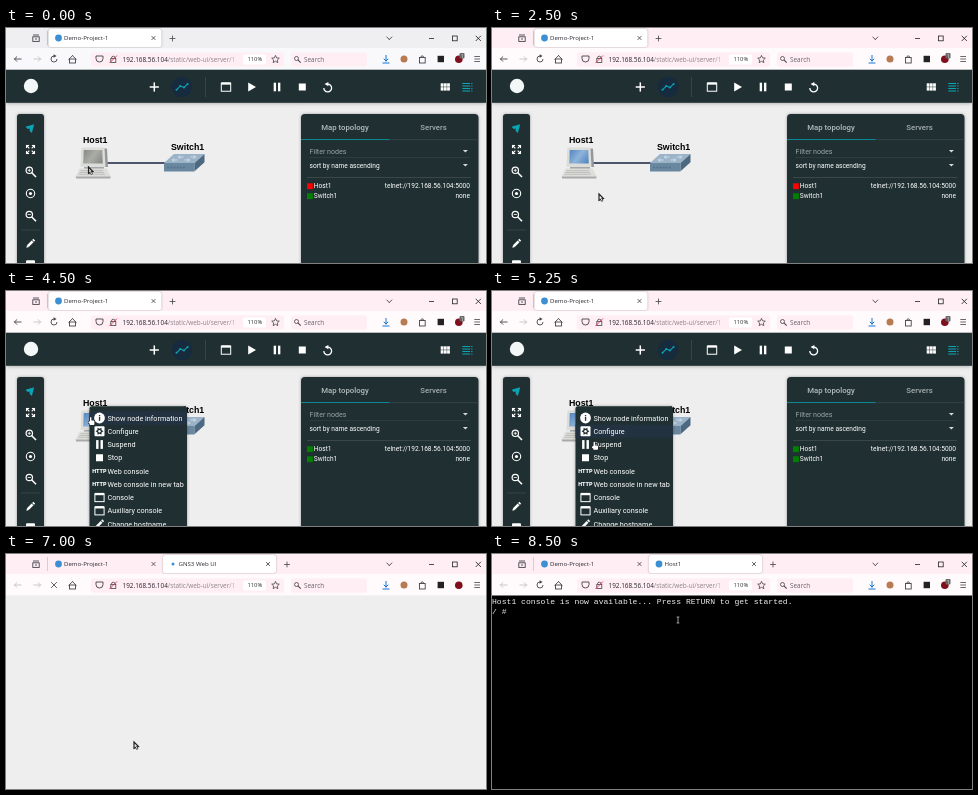
An HTML page with a canvas for the animation above (8750 ms loop, 480 px wide and 235 px high).

```html
<!DOCTYPE html>
<html lang="en">
<head>
<meta charset="utf-8">
<title>Web console demo</title>
<style>
html, body { margin: 0; width: 100%; height: 100%; overflow: hidden; background: #eee; }
canvas { display: block; width: 480px; height: 235px; }
</style>
</head>
<body>
<canvas id="stage"></canvas>
<script>
const W = 480, H = 235, LOOP = 8750, STEP = 250, ROW = 13.25, PI = Math.PI;
const canvas = document.getElementById('stage');
const dpr = window.devicePixelRatio || 1;
canvas.width = W * dpr;
canvas.height = H * dpr;
const c = canvas.getContext('2d');

const DARK = '#203032', TEAL = '#0aa5b5', WHITE = '#fff', INK = '#45434a', PALE = '#c6c1c4';
const UI = '"Open Sans", "Noto Sans", sans-serif';
const APP = 'Roboto, sans-serif';
const LABEL = '"Liberation Sans", Arial, sans-serif';
const MONO = '"Liberation Mono", monospace';

const HOME = { x: 82.5, y: 139 };
const MOVES = [
  { from: 1250, to: 2000, x: 107, y: 166 },
  { from: 3500, to: 4250, x: 84, y: 126 },
  { from: 4750, to: 6000, x: 128, y: 188 },
  { from: 7250, to: 8000, x: 186, y: 66 }
];

function pointerAt(t) {
  return MOVES.reduce((p, m) => {
    const u = Math.min(1, Math.max(0, (t - m.from) / (m.to - m.from)));
    return { x: p.x + (m.x - p.x) * u, y: p.y + (m.y - p.y) * u };
  }, HOME);
}

// Drawing helpers

function at(x, y, angle, draw) {
  c.save();
  c.translate(x, y);
  c.rotate(angle);
  draw();
  c.restore();
}

function rect(x, y, w, h, color) {
  c.fillStyle = color;
  c.fillRect(x, y, w, h);
}

function square(x, y, r, color) {
  rect(x - r, y - r, r * 2, r * 2, color);
}

function box(x, y, w, h, r, color) {
  c.fillStyle = color;
  c.beginPath();
  c.roundRect(x, y, w, h, r);
  c.fill();
}

function frame(x, y, w, h, color, width = .9) {
  c.strokeStyle = color;
  c.lineWidth = width;
  c.strokeRect(x, y, w, h);
}

function line(x1, y1, x2, y2, color, width = .9) {
  c.strokeStyle = color;
  c.lineWidth = width;
  c.beginPath();
  c.moveTo(x1, y1);
  c.lineTo(x2, y2);
  c.stroke();
}

function ring(x, y, r, color, width = .9, from = 0, to = PI * 2) {
  c.strokeStyle = color;
  c.lineWidth = width;
  c.beginPath();
  c.arc(x, y, r, from, to);
  c.stroke();
}

function disc(x, y, r, color) {
  c.fillStyle = color;
  c.beginPath();
  c.arc(x, y, r, 0, PI * 2);
  c.fill();
}

// Closed path around a centre; radius(i) sets the distance of each corner.
function radial(x, y, n, radius, angle) {
  c.beginPath();
  for (let i = 0; i < n; i++) {
    const a = angle + i * PI * 2 / n;
    c.lineTo(x + radius(i) * Math.cos(a), y + radius(i) * Math.sin(a));
  }
  c.closePath();
}

function tri(x, y, r, angle, color) {
  radial(x, y, 3, () => r, angle);
  c.fillStyle = color;
  c.fill();
}

// Symmetric trapezoid; the top may lean sideways by skew.
function slab(x, y, top, bottom, h, color, skew = 0) {
  c.fillStyle = color;
  c.beginPath();
  c.moveTo(x - top / 2 + skew, y);
  c.lineTo(x + top / 2 + skew, y);
  c.lineTo(x + bottom / 2, y + h);
  c.lineTo(x - bottom / 2, y + h);
  c.fill();
}

function chevron(x, y, r, angle, color, width = .9) {
  at(x, y, angle, () => {
    line(-r, -r, .3, .3, color, width);
    line(-r, r, .3, -.3, color, width);
  });
}

function arrow(x, y, r, angle, color, width = .9) {
  at(x, y, angle, () => line(-r, 0, r, 0, color, width));
  chevron(x + r * Math.cos(angle), y + r * Math.sin(angle), r * .75, angle, color, width);
}

function plus(x, y, r, color, width, angle = 0) {
  at(x, y, angle, () => {
    line(-r, 0, r, 0, color, width);
    line(0, -r, 0, r, color, width);
  });
}

function cross(x, y, r, color, width = .8) {
  plus(x, y, r * 1.41, color, width, PI / 4);
}

function text(str, x, y, size, family, color, weight = 400, align = 'left') {
  c.font = `${weight} ${size}px ${family}`;
  c.textAlign = align;
  c.fillStyle = color;
  c.fillText(str, x, y);
}

function shadowed(blur, draw) {
  c.save();
  c.shadowColor = 'rgba(0,0,0,.35)';
  c.shadowBlur = blur * dpr;
  draw();
  c.restore();
}

// Icons

function replay(x, y, r, color, width, flip = 1) {
  c.save();
  c.translate(x, y);
  c.scale(flip, 1);
  ring(0, 0, r, color, width, -PI / 2, PI);
  tri(-.6, -r, r * .65, PI, color);
  c.restore();
}

function pause(x, y, r, color) {
  for (const side of [-1, 1]) rect(x + side * r * .5 - r * .27, y - r, r * .55, r * 2, color);
}

function windowIcon(x, y, r, color) {
  frame(x - r, y - r * .8, r * 2, r * 1.7, color, 1);
  rect(x - r, y - r, r * 2, r * .5, color);
}

function pencil(x, y, color) {
  at(x, y, -PI / 4, () => {
    rect(-3.7, -1.3, 6.6, 2.6, color);
    rect(3.6, -1.3, 1.7, 2.6, color);
    tri(-4.3, 0, 1.6, PI, color);
  });
}

function magnifier(x, y, r, color, width) {
  ring(x, y, r, color, width);
  line(x + r * .7, y + r * .7, x + r * 2.1, y + r * 2.1, color, width * 1.3);
}

function gear(x, y) {
  box(x - 5, y - 5, 10, 10, 1, WHITE);
  radial(x, y, 12, i => i % 2 ? 2.4 : 3.9, 0);
  c.fillStyle = DARK;
  c.fill();
  disc(x, y, 1.2, WHITE);
}

function info(x, y) {
  disc(x, y, 5.4, WHITE);
  rect(x - .6, y - 1, 1.3, 3.8, DARK);
  rect(x - .6, y - 3, 1.3, 1.3, DARK);
}

const ICONS = {
  info, gear, pencil,
  play: (x, y) => tri(x - .8, y, 5, 0, WHITE),
  pause: (x, y) => pause(x, y, 4.4, WHITE),
  stop: (x, y) => square(x, y, 3.5, WHITE),
  http: (x, y) => text('HTTP', x, y + 2, 5.5, APP, WHITE, 800, 'center'),
  window: (x, y) => windowIcon(x, y, 4.6, WHITE),
  edit: (x, y) => pencil(x, y, WHITE)
};

// Browser

function tab(x, title, active, loading) {
  if (active) shadowed(2, () => box(x, 1, 113, 18, 2.5, WHITE));
  disc(x + 10, 10, loading ? 1.5 : 3.4, '#3b8fd2');
  text(title, x + 15.5, 12.3, 6.1, UI, '#29272e');
  cross(x + 105, 10, 1.9, INK);
}

function tabBar(t, second, loading) {
  rect(0, 0, W, 20, t < STEP ? '#efeff1' : '#ffeff5');
  frame(26.8, 8.8, 6.4, 4.6, INK);
  line(27, 7, 33, 7, INK);
  line(29, 11, 31, 11, INK);
  line(41.5, 3, 41.5, 17, PALE, .7);
  tab(42.5, 'Demo-Project-1', !second, false);
  if (second) tab(157, loading ? 'GNS3 Web UI' : 'Host1', true, loading);
  plus(second ? 281 : 166.5, 10.5, 2.9, INK, .8);
  chevron(383.3, 11.5, 2.8, PI / 2, INK);
  line(423, 10.5, 428, 10.5, '#222', .8);
  frame(446.4, 8, 4.8, 4.8, '#222', .8);
  cross(472.3, 10.4, 2.6, '#222');
}

function address() {
  box(85, 24.5, 193, 14, 2, '#ffeef4');
  ring(93.5, 30.5, 3.5, INK, .9, 0, PI);
  line(90, 30.5, 90, 28, INK);
  line(97, 30.5, 97, 28, INK);
  line(90, 28, 97, 28, INK);
  frame(104.8, 30.5, 5, 4, INK, .8);
  ring(107.3, 30, 1.8, INK, .8, PI, 0);
  line(103.5, 35, 111, 27.5, '#e0344d');
  const ip = '192.168.56.104';
  text(ip, 116.5, 33.6, 6.4, UI, '#25232a');
  const end = 116.5 + c.measureText(ip).width;
  const fade = c.createLinearGradient(222, 0, 236, 0);
  fade.addColorStop(0, '#8b8389');
  fade.addColorStop(1, 'rgba(139,131,137,0)');
  text('/static/web-ui/server/1', end, 33.6, 6.4, UI, fade);
  box(237, 26.5, 23, 10, 1.5, WHITE);
  text('110%', 248.8, 33.4, 5.8, UI, '#333', 400, 'center');
  radial(269.5, 31.4, 10, i => i % 2 ? 1.9 : 4, -PI / 2);
  c.strokeStyle = INK;
  c.lineWidth = .8;
  c.stroke();
}

function browser(t) {
  const second = t >= 6500, loading = second && t < 7250;
  tabBar(t, second, loading);
  rect(0, 20, W, 21.5, t < STEP ? '#f9f9fb' : '#fffafc');
  arrow(12, 31, 3.5, PI, second ? PALE : INK);
  arrow(31, 31, 3.5, 0, PALE);
  if (loading) cross(48, 31, 2.9, INK);
  else replay(48, 31, 3, INK, .9, -1);
  chevron(66.5, 27.6, 4, -PI / 2, INK);
  frame(63.5, 31, 6, 4, INK);
  address();
  box(285, 24.5, 76, 14, 2, '#ffeef4');
  magnifier(290.5, 30.5, 2, INK, .8);
  text('Search', 298, 33.5, 6.4, UI, '#67616a');
  arrow(380, 30, 3, PI / 2, '#1674d1', 1);
  line(376.5, 35, 383.5, 35, '#1674d1', 1);
  disc(398, 31, 3.5, '#b87a50');
  frame(413.5, 29.5, 5.7, 5.5, INK);
  ring(416.2, 29.3, 1.4, INK, .9, PI, 0);
  square(434.8, 31, 3.2, '#222');
  disc(452.8, 31.3, 3.8, '#800f1d');
  if (!loading) {
    box(453.5, 25, 5, 5.5, 1, '#666');
    text('1', 456, 29.5, 4.6, UI, WHITE, 400, 'center');
  }
  for (let y = 28.5; y < 35; y += 2.5) line(468.3, y, 474, y, INK, .8);
}

// Project page

function toolbar() {
  shadowed(4, () => rect(0, 41.5, W, 33.3, DARK));
  disc(25, 58, 7.2, '#f4f7f7');
  plus(148.3, 59, 4.6, WHITE, 1.5);
  disc(176, 59, 10.3, '#172b3e');
  const trendY = i => 60.5 - i * 1.1 + (i % 2 ? -1.3 : 1.3);
  for (let i = 0; i < 4; i++) {
    const x = 170.5 + i * 3.7;
    disc(x, trendY(i), 1, TEAL);
    if (i) line(x - 3.7, trendY(i - 1), x, trendY(i), TEAL, 1.1);
  }
  line(199.5, 49, 199.5, 69, '#3d4d4e', .8);
  windowIcon(220, 59, 4.7, WHITE);
  tri(244.8, 59, 5.2, 0, WHITE);
  pause(271, 59, 4.3, WHITE);
  square(296.3, 59, 3.5, WHITE);
  replay(321.7, 60, 3.9, WHITE, 1.3);
  for (let i = 0; i < 6; i++) {
    rect(434.7 + i % 3 * 3.2, 55.3 + (i > 2 ? 3.9 : 0), 2.8, 3.4, WHITE);
  }
  for (let y = 55; y < 64; y += 2.5) {
    rect(456.3, y, 7.8, 1, TEAL);
    rect(465.2, y, 1.3, 1, TEAL);
  }
}

function sidebar() {
  shadowed(3, () => box(11, 86, 27, 160, 3, DARK));
  at(24.5, 100, -PI / 4, () => {
    tri(0, 0, 5.2, 0, TEAL);
    tri(-2.6, 0, 1.8, 0, DARK);
  });
  for (let i = 0; i < 4; i++) {
    at(24.5, 121.5, i * PI / 2, () => {
      line(1.2, 1.2, 4, 4, WHITE, 1.1);
      line(4, 1.4, 4, 4.4, WHITE, 1.1);
      line(1.4, 4, 4.4, 4, WHITE, 1.1);
    });
  }
  for (const y of [142.3, 186.5]) {
    magnifier(23.3, y, 3.2, WHITE, 1.2);
    line(21.7, y, 24.9, y, WHITE, .8);
  }
  line(23.3, 140.7, 23.3, 143.9, WHITE, .8);
  ring(24.5, 165.5, 4.2, WHITE, 1.1);
  disc(24.5, 165.5, 1.6, WHITE);
  line(15, 202, 34, 202, '#3d4d4e', .7);
  pencil(24.5, 215.5, WHITE);
  box(20, 232.3, 9, 8, 1, WHITE);
}

function node(y, name, state, color) {
  rect(301, y - 5, 5.8, 5.8, color);
  text(name, 307.8, y, 6.6, APP, WHITE);
  text(state, 464, y, 6.6, APP, WHITE, 400, 'right');
}

function topology(running) {
  shadowed(3, () => box(295, 86, 177.5, 160, 4, DARK));
  text('Map topology', 339, 102, 7.75, APP, '#b3bdbd', 500, 'center');
  text('Servers', 427.5, 102, 7.75, APP, '#a3adad', 500, 'center');
  rect(295, 111.5, 177.5, .6, '#3e4d4e');
  rect(295, 111, 88.5, 1, '#0b8794');
  text('Filter nodes', 303.5, 125.6, 7.1, APP, '#98a3a3');
  text('sort by name ascending', 303.5, 139.8, 6.6, APP, WHITE);
  for (const y of [123, 137]) slab(459.4, y - 1, 5, 0, 2.5, '#d3dada');
  rect(303.5, 129.2, 160, .5, '#3b4a4b');
  rect(301, 149.3, 164, .6, '#4a5859');
  node(160.3, 'Host1', 'telnet://192.168.56.104:5000', running ? '#008000' : '#f00');
  node(170.3, 'Switch1', 'none', '#008000');
}

function computer(grey) {
  const glass = c.createLinearGradient(77, 122, 96, 136);
  const [edge, shine] = grey ? ['#858783', '#aaaca6'] : ['#4e83bd', '#8fb4dc'];
  [edge, shine, edge].forEach((color, i) => glass.addColorStop(i / 2, color));
  slab(88.5, 120.5, 25, 27, 18.5, '#94989a');
  slab(87, 119.5, 23, 25, 19.5, '#dcddd9');
  slab(87, 122, 18.5, 19.5, 13.5, glass);
  rect(78, 139, 20, 2, '#a5a8a9');
  slab(87.2, 140.5, 27, 35, 8, '#deded9');
  slab(87.2, 148.5, 35, 34, 2, '#a8aaa8');
  for (let i = 0; i < 3; i++) line(74.5 - i, 142.7 + i * 1.8, 97 + i, 142.7 + i * 1.8, '#b0b3b3', .7);
}

function switchBox() {
  rect(160, 126, 38.5, 9, '#eee');
  slab(173.2, 126, 30.5, 30.5, 9, '#9bb3c9', 10);
  rect(158, 135, 30.5, 8.5, '#69879f');
  c.save();
  c.transform(1, -.9, 0, 1, 188.5, 135);
  rect(0, 0, 10, 8.3, '#4d6981');
  c.restore();
  for (let i = 0; i < 4; i++) arrow(169 + i * 6, i % 2 ? 129 : 132, 2.5, i < 2 ? PI : 0, '#dbe5ed', .8);
  for (let x = 161; x < 180; x += 3.2) rect(x, 138.7, 2, 1.6, '#587590');
}

function network(grey) {
  line(99, 135, 162, 135, '#17213f', 1.4);
  computer(grey);
  switchBox();
  text('Host1', 77, 114.6, 8.8, LABEL, '#000', 700);
  text('Switch1', 165, 122.2, 8.8, LABEL, '#000', 700);
}

function menu(x, y, running, t) {
  const power = running ? [['pause', 'Suspend'], ['stop', 'Stop']] : [['play', 'Start']];
  const items = [
    ['info', 'Show node information'], ['gear', 'Configure'], ...power,
    ['http', 'Web console'], ['http', 'Web console in new tab'],
    ['window', 'Console'], ['window', 'Auxiliary console'], ['edit', 'Change hostname']
  ];
  // the highlight trails the pointer by one step
  const hover = Math.floor((pointerAt(t - STEP).y - y - 5.5) / ROW);
  shadowed(3, () => box(x, y, 97.5, 140, 2.5, DARK));
  items.forEach(([icon, name], i) => {
    const mid = y + 11.8 + i * ROW;
    if (i === hover) rect(x, mid - ROW / 2, 97.5, ROW, '#233240');
    ICONS[icon](x + 10, mid);
    text(name, x + 18, mid + 2.6, 7.25, APP, WHITE);
  });
}

// Pointer shapes, each with its tip at the origin

function hand() {
  for (const [grow, color] of [[.5, '#222'], [0, WHITE]]) {
    const part = (x, y, w, h) => box(x - grow, y - grow, w + grow * 2, h + grow * 2, .8, color);
    part(0, 0, 1.4, 6);
    part(-1.6, 4.4, 2, 2);
    part(-.4, 3.6, 4.8, 4.4);
  }
}

function cursor() {
  c.beginPath();
  c.moveTo(0, 0);
  c.lineTo(0, 6.3);
  c.lineTo(4.5, 4.6);
  c.closePath();
  c.strokeStyle = '#222';
  c.lineWidth = 1.2;
  c.stroke();
  line(2, 4.5, 3.4, 7.4, '#222', 2);
  c.fillStyle = WHITE;
  c.fill();
  line(2, 4.5, 3.1, 6.9, WHITE, .9);
}

function beam() {
  line(0, -3, 0, 3, '#ddd', .7);
  for (const y of [-3, 3]) line(-1.3, y, 1.3, y, '#ddd', .7);
}

function pointer(t, shape) {
  const { x, y } = pointerAt(t);
  at(x, y, 0, shape);
}

function editor(t) {
  const first = t >= 1000 && t < 2250, second = t >= 4500;
  network(t < 750);
  toolbar();
  sidebar();
  topology(t >= 3750);
  if (first) menu(82.5, 128.2, false, t);
  if (second) menu(83.5, 115.2, true, t);
  pointer(t, first || second ? hand : cursor);
}

function terminal(t) {
  rect(0, 41, W, H - 41, '#000');
  text('Host1 console is now available... Press RETURN to get started.', 0, 49.6, 8.09, MONO, '#eee');
  if (t >= 8250) text('/ #', 0, 59.6, 8.09, MONO, '#eee');
  pointer(t, beam);
}

function draw(now) {
  const t = Math.floor(now % LOOP / STEP) * STEP;
  c.setTransform(dpr, 0, 0, dpr, 0, 0);
  rect(0, 0, W, H, '#eee');
  if (t < 6500) editor(t);
  else if (t < 7250) pointer(t, cursor);
  else terminal(t);
  browser(t);
}

const start = performance.now();
function tick() {
  draw(performance.now() - start);
  requestAnimationFrame(tick);
}
tick();
</script>
</body>
</html>
```
